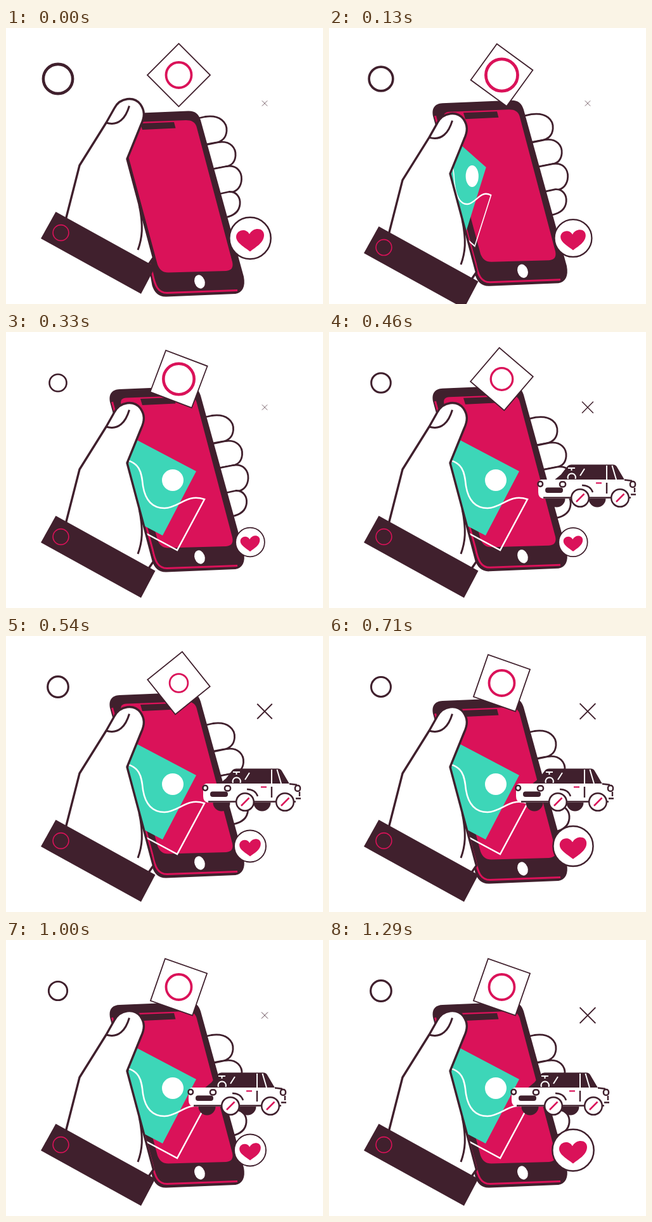
Write an HTML page that moves like this. It is 500x434 px and loops after 2040 ms.

```html
<!DOCTYPE html>
<html lang="en">
<head>
<meta charset="utf-8">
<title>Phone in hand</title>
<style>
  html, body { margin: 0; width: 100%; height: 100%; overflow: hidden; background: #fff; }
  svg { display: block; width: 100%; height: 100%; }
  .ink { fill: #40202d; }
  .red { fill: #da1259; }
  .teal { fill: #3dd6b8; }
  .paper { fill: #fff; }
  .line { fill: none; stroke: #40202d; }
  .skin { fill: #fff; stroke: #40202d; stroke-linejoin: round; }
  .redLine { fill: none; stroke: #da1259; }
  .whiteLine { fill: none; stroke: #fff; }
</style>
</head>
<body>
<svg viewBox="0 0 500 434">
  <g id="dot"><circle class="line" r="16.3" stroke-width="3.2"/></g>
  <g id="cross"><path class="line" stroke-width="2" d="M-12-12L12 12M12-12L-12 12"/></g>

  <g id="fingers" class="skin" stroke-width="2.8">
    <path d="M285 146L314 139.500C338 136 349 149 348 162C347 174 339 179 330 180.500L300 186Z"/>
    <path d="M300 187L336 179.500C354 177 363 189 362 201C361 212 355 216.500 347 218L310 225Z"/>
    <path d="M310 225L348 217.500C365 215 372 227 371.500 238C371 250 364 256.500 357 258L322 264Z"/>
    <path d="M322 264L352 257.500C364 257 370 267 369 277C368 288 360 295 346 298L330 300Z"/>
  </g>

  <g id="phone">
    <path class="ink" d="M164.500 124C161 110 167 102.500 179 102L287 97.500C298 97 304 102 307 112L375 358C378 374 373 383 362 385L253 389.500C241 390 234 383 230.500 372L228 358Z"/>
    <path class="red" d="M181.500 126C180 119 183 116 190 115.500L284 112C293 112 298 115 300.500 122L357 335C359 344 355 348.500 347 349L256 351.500C247 351.500 242 347 239 339Z"/>
    <path class="ink" d="M212 117L265 115L267.500 124.500L215 127Z"/>
    <path class="redLine" stroke-width="3" d="M167.500 122L231 353C235 373 240 383.500 254 383.500L365 379.500"/>
    <ellipse class="paper" rx="8" ry="11" transform="translate(305.500 366) rotate(-20)"/>
  </g>

  <g id="card">
    <path class="teal" d="M300 219L247 320L180 285L200 166.500Z"/>
    <circle class="paper" cx="263" cy="233" r="17"/>
    <path class="whiteLine" stroke-width="2.5" d="M180 200C212 202 214 222 216 242C220 266 232 277 250 277C274 276 284 254 313 263L270 343L195 303"/>
  </g>

  <g id="hand">
    <path class="skin" stroke-width="3.4" d="M94 302L116 216L158 149L171 126C180 109 202 107 212 120C219 130 219 139 213 152L191 206L232.500 361L222 376Z"/>
    <path class="line" stroke-width="3" d="M158 149C178 155 189 141 194.500 122.500M210 278C217 312 215 330 208 349"/>
    <path class="ink" d="M78.500 289L235.500 375.500L213 418L55 331Z"/>
    <circle class="redLine" cx="86.500" cy="322" r="12.400" stroke-width="1.600"/>
  </g>

  <g id="tile"><rect class="skin" x="-35" y="-35" width="70" height="70" stroke-width="1.800" style="stroke-linejoin:miter"/></g>
  <g id="ring"><circle class="redLine" r="20" stroke-width="3.8"/></g>

  <g id="car">
    <circle class="ink" cx="317" cy="262" r="13.500"/>
    <circle class="ink" cx="381" cy="262" r="13.500"/>
    <path class="ink" d="M313 233L324 224L334 211Q336 208.500 340 208.500H406Q410 208.500 412 212L425 234Z"/>
    <path class="whiteLine" stroke-width="2" d="M335 214H346M340.500 214V218M354 226L361 215M396 210V233M404.500 210L411 232M335 231A6.200 6.200 0 1 1 346.500 231"/>
    <path class="paper" d="M293 232H436Q441 233 441 240V256Q440 262 434 262H296Q288 261 288 252V238Q288 233 293 232Z"/>
    <path class="line" stroke-width="2.400" d="M424 232.500L436 234M440 245V252M434 255.500H442M296 260.500H434M396 237V254M357 241Q370 241 374 252"/>
    <rect class="ink" x="299" y="244.500" width="28" height="8.500" rx="4"/>
    <rect class="skin" x="287.500" y="235" width="7.500" height="8" rx="3.700" stroke-width="2.500"/>
    <rect class="skin" x="322" y="235.500" width="9" height="8" rx="3.500" stroke-width="2.500"/>
    <rect class="skin" x="433" y="235" width="8" height="9" rx="3.800" stroke-width="2.500"/>
    <path class="redLine" stroke-width="2.200" d="M379 237.500H388"/>
    <circle class="skin" cx="354" cy="261" r="13.800" stroke-width="2.500"/>
    <circle class="skin" cx="417" cy="261" r="13.800" stroke-width="2.500"/>
    <path class="redLine" stroke-width="2.600" d="M348 267L360.500 254.500M411 267L423.500 254.500"/>
  </g>

  <g id="like">
    <circle class="skin" r="32.700" stroke-width="2.500"/>
    <path class="red" d="M0 21C-9 14-22 7-22-2C-22-13-7-17-1-6.500C5-18 22-17 22-5C22 7 9 14 0 21Z"/>
  </g>
</svg>
<script>
const LOOP = 2040, FPS = 24, LAST = 31;
const part = id => document.getElementById(id);
const place = (id, value) => part(id).setAttribute('transform', value);

// Smooth curve through [step, value] keys that never overshoots them.
function track(...keys) {
  const rise = keys.slice(1).map((k, i) => (k[1] - keys[i][1]) / (k[0] - keys[i][0]));
  const slope = keys.map((k, i) => {
    if (i === 0) return rise[0];
    if (i === rise.length) return 0;
    const a = rise[i - 1], b = rise[i];
    return a * b > 0 ? 2 * a * b / (a + b) : 0;
  });
  return n => {
    if (n <= keys[0][0]) return keys[0][1];
    const i = keys.findIndex(k => k[0] >= n) - 1;
    if (i < 0) return keys[keys.length - 1][1];
    const [x0, y0] = keys[i], [x1, y1] = keys[i + 1];
    const w = x1 - x0, u = (n - x0) / w, v = 1 - u;
    return y0 * v * v * (1 + 2 * u) + y1 * u * u * (3 - 2 * u)
      + w * u * v * (slope[i] * v - slope[i + 1] * u);
  };
}

const dotSize = track([0, 1.42], [5, 1], [8, .83], [13, 1], [17, .95], [24, .9], [31, 1]);
const crossSize = track([0, .35], [8, .35], [13, .98], [17, 1.03], [24, .42], [31, 1.03]);
const likeSize = track([0, 1], [5, .83], [8, .7], [10, .68], [13, .765], [17, .965], [24, .765], [31, 1]);
const tileTurn = track([0, 45], [5, 30], [8, 20.7], [13, 51.3], [17, 19.2]);
const ringSize = track([0, 1], [5, 1.34], [8, 1.21], [13, .72], [17, 1]);
const phoneY = track([0, 33], [5, 5], [8, -12], [10, -14], [13, -9], [17, 0]);
const handY = track([0, 0], [5, 31], [8, 0]);
const fingerX = track([0, 0], [5, 8], [8, 10.5], [13, 12.5], [17, 10]);
const fingerY = track([0, 0], [5, -6], [8, -8], [13, -2], [17, 10]);
const cardWidth = track([0, 0], [5, .868], [8, 1]);
const carX = track([10, 53], [13, 23], [17, 7], [24, 0]);

function draw(time) {
  const tick = Math.floor(time / 10) * 10;
  const n = Math.min(LAST, Math.floor((tick + 4.99) * FPS / 1000));
  place('dot', `translate(82 80) scale(${dotSize(n)})`);
  place('cross', `translate(408 118.500) scale(${crossSize(n)})`);
  place('like', `translate(385 330.500) scale(${likeSize(n)})`);
  place('tile', `translate(272.500 74) rotate(${tileTurn(n)})`);
  place('ring', `translate(272.500 74) scale(${ringSize(n)})`);
  place('phone', `translate(0 ${phoneY(n)})`);
  place('hand', `translate(0 ${handY(n)})`);
  place('fingers', `translate(${fingerX(n)} ${fingerY(n)})`);
  place('card', `translate(171 0) scale(${cardWidth(n)} 1) translate(-171 0)`);
  part('card').style.display = n > 0 ? '' : 'none';
  place('car', `translate(${carX(n)} 0)`);
  part('car').style.display = n >= 10 ? '' : 'none';
}

const start = performance.now();
function run(now) {
  draw(Math.max(0, now - start) % LOOP);
  requestAnimationFrame(run);
}
draw(0);
requestAnimationFrame(run);
</script>
</body>
</html>
```
